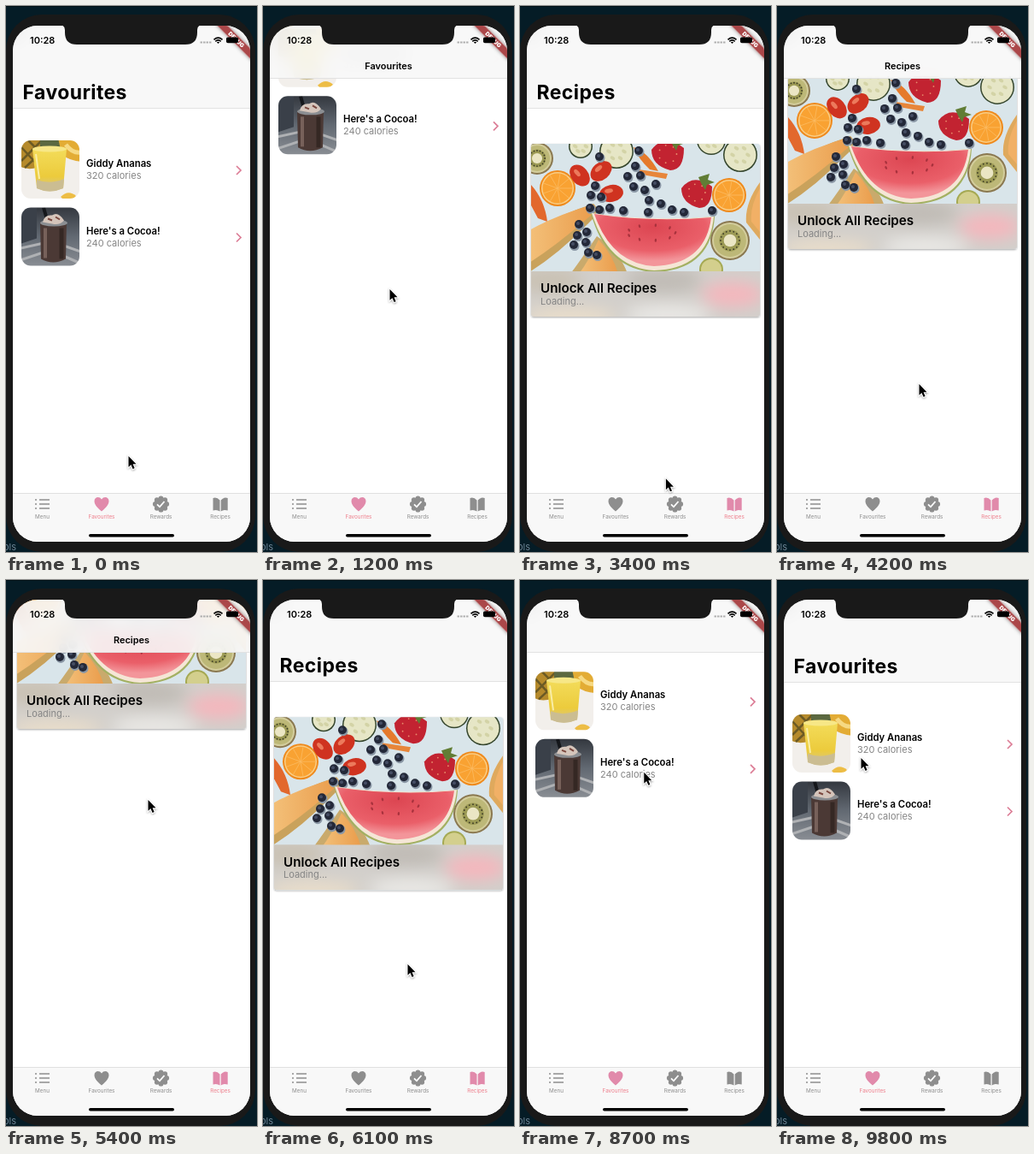
An HTML page for the animation above (9.9 s loop, 294x638 px).

```html
<!DOCTYPE html>
<html lang="en">
<head>
<meta charset="utf-8">
<title>Favourites and recipes</title>
<style>
  html, body { margin: 0; width: 100%; height: 100%; overflow: hidden; background: #051c26; }
  svg, #screen, #nav { position: absolute; left: 0; top: 0; }
  svg { width: 294px; height: 638px; font-family: Inter, sans-serif; }
  #screen { width: 294px; height: 638px; background: #fff; clip-path: inset(23px 8px 12px 8px round 29px); }
  #nav { width: 294px; box-sizing: border-box; background: rgba(248, 248, 248, .91);
         backdrop-filter: blur(10px); border-bottom: 1px solid #e2e2e2; }
  .name { font-size: 11.3px; font-weight: 600; }
  .note { font-size: 11px; fill: #858585; }
  .large { font-size: 23px; font-weight: 700; letter-spacing: .4px; }
  .tab { color: #8e8e8e; }
  .tab text { font-size: 6.3px; fill: #8e8e8e; text-anchor: middle; }
  .tab.on { color: #e18aab; }
  .tab.on text { fill: #ee7f8c; }
  .chevron { fill: none; stroke: #dc7d96; stroke-width: 1.7; }
</style>
</head>
<body>
<svg viewBox="0 0 294 638">
  <rect width="294" height="1" fill="#021016"/>
  <text x="-3" y="636" font-size="11" fill="#6d8494">ols</text>
  <rect x="0" y="10" width="292" height="628" rx="42" fill="#191919"/>
</svg>

<div id="screen">
  <svg viewBox="0 0 294 638">
    <defs>
      <clipPath id="thumb"><rect width="68" height="68" rx="11"/></clipPath>
      <clipPath id="cardClip"><rect width="268" height="202" rx="3"/></clipPath>
      <clipPath id="stripClip"><rect y="149" width="268" height="53"/></clipPath>
      <linearGradient id="juice" x2="0" y2="1">
        <stop offset="0" stop-color="#f3dc5a"/><stop offset=".65" stop-color="#eccb3c"/><stop offset="1" stop-color="#d3c594"/>
      </linearGradient>
      <linearGradient id="slate" x2="0" y2="1">
        <stop offset="0" stop-color="#30343b"/><stop offset=".5" stop-color="#626972"/><stop offset="1" stop-color="#8c9096"/>
      </linearGradient>
      <radialGradient id="melon" cx=".5" cy=".25" r=".65">
        <stop offset="0" stop-color="#dc4652"/><stop offset=".7" stop-color="#ea5f69"/><stop offset="1" stop-color="#f3959a"/>
      </radialGradient>
      <linearGradient id="cantaloupe">
        <stop offset="0" stop-color="#f3c079"/><stop offset="1" stop-color="#ea9c4b"/>
      </linearGradient>
      <filter id="soft"><feGaussianBlur stdDeviation=".7"/></filter>
      <filter id="photo"><feGaussianBlur stdDeviation=".45"/></filter>
      <filter id="haze" x="-50%" y="-50%" width="200%" height="200%"><feGaussianBlur stdDeviation="9"/></filter>
      <filter id="lift" x="-5%" y="-5%" width="110%" height="112%"><feDropShadow dx="0" dy="1" stdDeviation="1" flood-opacity=".35"/></filter>
      <filter id="glow" x="-20%" y="-150%" width="140%" height="400%"><feDropShadow dx="0" dy="0" stdDeviation="2" flood-opacity=".5"/></filter>
    </defs>

    <g id="favourites">
      <g transform="translate(18 157)">
        <g clip-path="url(#thumb)"><g filter="url(#soft)">
          <rect x="-3" y="-3" width="74" height="74" fill="#f2efeb"/>
          <path d="M-3-3H30V26Q12 38-3 30Z" fill="#b58a2c"/>
          <path d="M0 8L22 32M8 0L30 22M0 24L24 0M4 32L30 8" stroke="#6b5a24" stroke-width="2.5"/>
          <path d="M22-3H46V8H22Z" fill="#5b6840"/>
          <path d="M43-3H71V25Q56 24 47 16Z" fill="#e3ac35"/>
          <path d="M52 5Q60 16 71 14" fill="none" stroke="#f6d983" stroke-width="5"/>
          <path d="M13 10H53L49 56Q33 63 18 56Z" fill="url(#juice)"/>
          <ellipse cx="33" cy="10" rx="20" ry="3.5" fill="#f7e787"/>
          <path d="M18 46Q33 52 50 45L49 56Q33 63 18 56Z" fill="#cbbd92"/>
          <path d="M17 16L21 45" stroke="#f9eda6" stroke-width="2"/>
          <path d="M46 66Q55 57 64 65L60 69H49Z" fill="#edbd45"/>
        </g></g>
        <text class="name" x="76" y="31">Giddy Ananas</text>
        <text class="note" x="76" y="45">320 calories</text>
        <path class="chevron" d="M252 30l5 5-5 5"/>
      </g>
      <g transform="translate(18 235.5)">
        <g clip-path="url(#thumb)"><g filter="url(#soft)">
          <rect x="-3" y="-3" width="74" height="74" fill="url(#slate)"/>
          <path d="M-3 48L24 42M-3 62L24 53M48 44L71 52M48 56L71 66" stroke="#afb1b4" stroke-width="3"/>
          <path d="M26 0L30 14" stroke="#15171b" stroke-width="4"/>
          <path d="M0 0H18V36L0 42Z" fill="#3a4049"/>
          <path d="M22 17H53L52 60Q37 68 23 60Z" fill="#4b3935"/>
          <path d="M28 24V59" stroke="#77615a" stroke-width="4"/>
          <path d="M47 24V60" stroke="#352824" stroke-width="5"/>
          <ellipse cx="38" cy="18" rx="16" ry="4" fill="#8b8e92"/>
          <path d="M25 17Q27 8 36 9Q43 4 50 15Q45 21 36 19Z" fill="#d5c5bb"/>
          <path d="M31 13L36 15M40 11L45 14" stroke="#7a473e" stroke-width="2"/>
        </g></g>
        <text class="name" x="76" y="31">Here's a Cocoa!</text>
        <text class="note" x="76" y="45">240 calories</text>
        <path class="chevron" d="M252 30l5 5-5 5"/>
      </g>
    </g>

    <g id="recipes">
      <g transform="translate(13 161)">
        <rect width="268" height="202" rx="3" fill="#d9e5ea" filter="url(#lift)"/>
        <g clip-path="url(#cardClip)">
          <g id="fruit" filter="url(#photo)"></g>
          <g clip-path="url(#stripClip)">
            <rect y="149" width="268" height="53" fill="#d2cfcb"/>
            <g filter="url(#haze)">
              <ellipse cx="20" cy="160" rx="40" ry="14" fill="#c9c1b3"/>
              <ellipse cx="155" cy="160" rx="45" ry="14" fill="#c0bbb5"/>
              <ellipse cx="45" cy="202" rx="55" ry="10" fill="#ecdfca"/>
              <ellipse cx="160" cy="200" rx="50" ry="12" fill="#eae9e6"/>
              <ellipse cx="236" cy="176" rx="36" ry="15" fill="#f4b7bd"/>
            </g>
          </g>
        </g>
        <text x="11" y="174.500" font-size="15.2" font-weight="600">Unlock All Recipes</text>
        <text class="note" x="11" y="188">Loading...</text>
      </g>
    </g>
  </svg>

  <div id="nav"></div>

  <svg viewBox="0 0 294 638">
    <clipPath id="titleClip"><rect y="84" width="294" height="60"/></clipPath>
    <g clip-path="url(#titleClip)"><text id="large" class="large" x="19.5"></text></g>
    <text id="small" x="147" y="74" font-size="11" font-weight="600" text-anchor="middle"></text>

    <rect y="569" width="294" height="69" fill="#f8f8f8"/>
    <rect y="569" width="294" height="1" fill="#e0e0e0"/>
    <g class="tab">
      <path d="M39 577H51M39 582H51M39 587H51M34 577h2M34 582h2M34 587h2" stroke="currentColor" stroke-width="1.7"/>
      <text x="42.5" y="599">Menu</text>
    </g>
    <g class="tab" id="tabFavourites">
      <path d="M112 590.5C106 585.5 103.5 582 103.5 578.5C103.5 573.5 109.5 572.5 112 576.5C114.5 572.5 120.5 573.5 120.5 578.5C120.5 582 118 585.5 112 590.5Z" fill="currentColor"/>
      <text x="112" y="599">Favourites</text>
    </g>
    <g class="tab">
      <g id="seal" fill="currentColor"></g>
      <path d="M177 582.3l3 3 5.5-6.3" fill="none" stroke="#fff" stroke-width="1.8"/>
      <text x="181.5" y="599">Rewards</text>
    </g>
    <g class="tab" id="tabRecipes">
      <path d="M250.5 577.5Q247 573.5 242.5 575V589.5Q247 588 250.5 590.5ZM251.700 577.5Q255 573.5 259.700 575V589.5Q255 588 251.700 590.5Z" fill="currentColor"/>
      <text x="251" y="599">Recipes</text>
    </g>
    <rect x="97" y="617" width="100" height="3.6" rx="1.8"/>

    <g transform="translate(269.8 39.2) rotate(45)">
      <rect x="-45" y="-4.200" width="90" height="8.400" fill="#ab4648" filter="url(#glow)"/>
      <text y="2.400" font-size="6.700" font-weight="900" fill="#fff" text-anchor="middle">DEBUG</text>
    </g>
    <text x="28" y="44" font-size="11" font-weight="600">10:28</text>
    <path d="M227.5 42.5h2.5m1 0h2.5m1 0h2.5m1 0h2.5" stroke="#b0b0b0" stroke-width="2"/>
    <path d="M243.5 39.3Q248.5 34.8 253.5 39.3M245.3 41.3Q248.5 38.5 251.7 41.3" fill="none" stroke="#000" stroke-width="1.6"/>
    <path d="M246.8 42.3Q248.5 41 250.2 42.3L248.5 44Z"/>
    <rect x="258" y="36.5" width="14" height="6.8" rx="1.8"/>
    <path d="M64 22Q69 23 69 28V31Q69 45 83 45H210Q224 45 224 31V28Q224 23 229 22Z" fill="#191919"/>
  </svg>
</div>

<svg viewBox="0 0 294 638">
  <filter id="shade" x="-50%" y="-30%" width="200%" height="180%"><feDropShadow dx="0" dy="1" stdDeviation=".8" flood-opacity=".4"/></filter>
  <path id="cursor" d="M.5 1V13.800L3.400 11.100L5.600 16L7.600 15.100L5.600 10.300H9.500Z" stroke="#fff" stroke-width="1.800" paint-order="stroke" filter="url(#shade)"/>
</svg>

<script>
const $ = id => document.getElementById(id);
const clamp = v => Math.max(0, Math.min(1, v));
const disc = (x, y, r, fill) => `<circle cx="${x}" cy="${y}" r="${r}" fill="${fill}"/>`;
const oval = (x, y, rx, ry, turn, fill) =>
  `<ellipse rx="${rx}" ry="${ry}" fill="${fill}" transform="translate(${x} ${y}) rotate(${turn})"/>`;
const shape = (d, fill) => `<path d="${d}" fill="${fill}"/>`;
const ring = (n, r, draw) => Array.from({ length: n }, (_, i) => {
  const a = i * 2 * Math.PI / n;
  return draw(r * Math.cos(a), r * Math.sin(a));
}).join('');

const kiwi = (x, y, r) => disc(x, y, r, '#8a7850') + disc(x, y, r - 2, '#d3cd9c') + disc(x, y, r - 4, '#bdb878') +
  disc(x, y, r * .55, '#9c9a55') + ring(16, r * .48, (u, v) => disc(x + u, y + v, .9, '#3b3a25')) +
  disc(x, y, r * .32, '#ebe6c4');
const cucumber = (x, y, r) => disc(x, y, r, '#34452c') + disc(x, y, r - 1.5, '#e6e6c6') +
  ring(6, r * .45, (u, v) => oval(x + u, y + v, 3, 2, 30, '#d3d3a6'));
const orange = (x, y, r) => disc(x, y, r, '#ef8a1c') + disc(x, y, r - 2, '#f9cd85') + disc(x, y, r - 3.5, '#f9a232') +
  ring(9, r - 4, (u, v) => `<path d="M${x} ${y}l${u} ${v}" stroke="#fbbb62" stroke-width=".8"/>`);
const tomato = (x, y, turn) => oval(x, y, 14, 10, turn, '#cf3320') + oval(x - 3, y - 3, 5, 2.5, turn, '#ec7a5c');
const strawberry = (x, y, r) => shape(`M${x - r} ${y - 5}Q${x - 4} ${y - r * 1.3} ${x + r} ${y - 7}Q${x + r} ${y + r} ${x + 3} ${y + r}Q${x - r} ${y + r * .7} ${x - r} ${y - 5}Z`, '#c22331') +
  ring(7, r * .55, (u, v) => disc(x + u, y + v, .9, '#e88d6c')) +
  shape(`M${x + 2} ${y - r}l13-4-2 7 8 3-9 3-2 6-5-8Z`, '#617d35');

const berries = [[80, 15], [122, 26], [128, 37], [113, 38], [75, 49], [70, 60], [82, 62], [92, 75], [80, 77], [69, 75],
  [120, 50], [133, 54], [146, 47], [137, 80], [152, 70], [165, 77], [179, 80], [138, 66], [56, 94], [65, 103], [54, 107],
  [64, 115], [50, 118], [67, 127], [77, 130], [126, 8], [108, 78], [212, 78]];

$('fruit').innerHTML =
  kiwi(7, 17, 19) + cucumber(58, 3, 14) + cucumber(100, 9, 20) + cucumber(245, 13, 20) + cucumber(211, -4, 17) +
  shape('M120 4Q136 9 149 32L139 30Q126 18 120 4Z', '#e57a2b') + shape('M126 30L160 35L158 41L130 36Z', '#e7863a') +
  shape('M0 48Q16 66 19 91L8 87L0 72Z', '#e2682d') +
  orange(31, 52, 21) + tomato(57, 37, 50) + tomato(82, 32, -40) + tomato(94, 58, -10) +
  shape('M-2 104Q30 84 73 70Q83 79 68 92Q33 128-2 150Z', '#c9a25c') +
  shape('M-2 101Q30 83 73 71Q79 78 66 87Q32 117-2 139Z', 'url(#cantaloupe)') +
  shape('M46 152Q58 136 77 108Q104 126 113 152Z', '#c9aa6c') +
  shape('M56 152Q68 136 79 112Q96 130 102 152Z', 'url(#cantaloupe)') +
  shape('M268 45Q250 70 252 92L268 112Z', '#dfa95d') + shape('M268 52Q256 74 258 91L268 103Z', '#f1b066') +
  berries.map(([x, y]) => disc(x + 1, y + 1.5, 5.5, '#8a97a5') + disc(x, y, 5, '#232838') + disc(x - 1, y - 1, 2, '#454d64')).join('') +
  strawberry(160, 12, 19) + strawberry(194, 57, 18) + orange(232, 60, 20) +
  shape('M70 81Q142 92 215 85Q211 148 144 150Q88 147 70 81Z', '#a3b062') +
  shape('M71 81Q142 91 214 85Q208 146 144 148Q91 145 71 81Z', '#f5e6d6') +
  shape('M74 82Q142 92 211 86Q204 141 144 143Q94 140 74 82Z', 'url(#melon)') +
  ring(9, 1, (u, v) => oval(141 + u * 28, 104 + v * 9, 1.2, 2, u * 30, '#a8323d')) +
  kiwi(233, 113, 23) + disc(211, 147, 14, '#a5a953') + disc(211, 147, 12, '#d3cf8d');

$('seal').innerHTML = disc(181.5, 582, 7.8, 'currentColor') +
  ring(8, 6.7, (u, v) => disc(181.5 + u, 582 + v, 2.9, 'currentColor'));

// Pointer path as [ms, x, y]; drags as [press, release].
const LOOP = 9900;
const path = [[0, 143, 525], [300, 143, 525], [1200, 148, 330], [1900, 160, 380], [2400, 262, 578], [2750, 258, 578],
  [3500, 166, 550], [4200, 166, 441], [5400, 166, 256], [5450, 166, 256], [6100, 169, 448], [6700, 112, 581],
  [6950, 112, 581], [7450, 160, 465], [7700, 161, 393], [8200, 152, 240], [8500, 148, 225], [9800, 98, 207], [LOOP, 98, 207]];
const drags = [[300, 1900], [3500, 5450], [7450, 8500]];
const OPEN_RECIPES = 2600, OPEN_FAVOURITES = 6900;
const COLLAPSE = 35, FRICTION = .595, SPRING = 85;

function pointer(t) {
  const i = path.findIndex(k => k[0] > t);
  const [t0, x0, y0] = path[i - 1], [t1, x1, y1] = path[i];
  let p = (t - t0) / (t1 - t0);
  if (!drags.some(([a, b]) => t >= a && t < b)) p = p * p * (3 - 2 * p);
  return [x0 + (x1 - x0) * p, y0 + (y1 - y0) * p];
}

function scrollAt(t) {
  const drag = drags.filter(d => d[0] <= t).pop();
  if (!drag) return 0;
  const [press, release] = drag;
  const pull = Math.max(0, pointer(press)[1] - pointer(Math.min(t, release))[1]);
  const offset = Math.min(pull, COLLAPSE) + Math.max(0, pull - COLLAPSE) * FRICTION;
  const rest = Math.max(0, t - release) / SPRING;
  return offset * (1 + rest) * Math.exp(-rest);
}

function draw() {
  const t = performance.now() % LOOP, scroll = scrollAt(t), [x, y] = pointer(t);
  const onRecipes = t >= OPEN_RECIPES && t < OPEN_FAVOURITES;
  const shift = Math.min(scroll, COLLAPSE), shown = clamp((scroll - 52) / 24);
  for (const [page, tab, active] of [['favourites', 'tabFavourites', !onRecipes], ['recipes', 'tabRecipes', onRecipes]]) {
    $(page).style.display = active ? '' : 'none';
    $(page).setAttribute('transform', `translate(0 ${-scroll})`);
    $(tab).classList.toggle('on', active);
  }
  $('large').textContent = $('small').textContent = onRecipes ? 'Recipes' : 'Favourites';
  $('large').setAttribute('y', 109 - scroll);
  $('large').style.opacity = 1 - shown;
  $('small').style.opacity = shown;
  $('nav').style.height = 120 - shift + 'px';
  $('cursor').setAttribute('transform', `translate(${x} ${y})`);
  requestAnimationFrame(draw);
}
requestAnimationFrame(draw);
</script>
</body>
</html>
```
